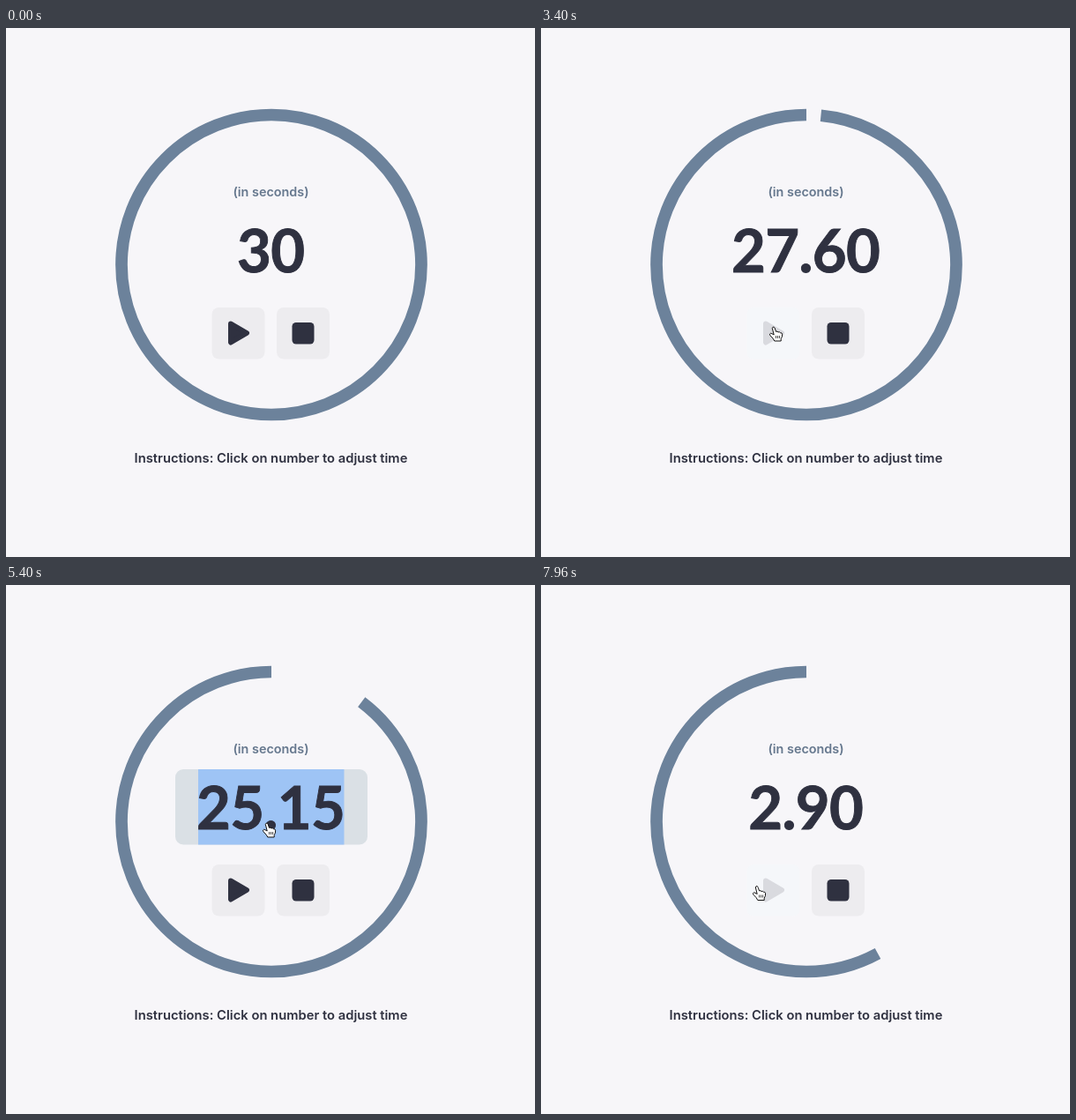
Animation, 600 px wide and 600 px high, one loop 8000 ms. Source, as an HTML page:

```html
<!DOCTYPE html>
<html lang="en">
<head>
<meta charset="utf-8">
<title>Countdown timer</title>
<style>
  html, body { margin: 0; width: 100%; height: 100%; overflow: hidden; background: #f7f6f9; }
  svg { display: block; width: 100vw; height: 100vh; }
  text { text-anchor: middle; font-family: Inter, sans-serif; font-weight: 600; fill: #2f3140; }
  #value { font: 700 67px Lato, sans-serif; letter-spacing: -.6px; stroke: #2f3140; stroke-width: .9; }
  #unit { fill: #66788e; }
  .icon { fill: #2f3140; }
  .triangle { stroke: #2f3140; stroke-width: 6; stroke-linejoin: round; }
  .disabled .icon { fill: #d9dadf; stroke: #d9dadf; }
  .face { fill: #edecef; }
  .hover .face { fill: #dddbdf; }
  .disabled .face { fill: #f5f7fa; }
</style>
</head>
<body>
<svg viewBox="0 0 600 600">
  <circle id="ring" cx="301" cy="268.5" r="170" pathLength="360" fill="none"
    stroke="#6c829b" stroke-width="13.7" transform="rotate(-90 301 268.5)"/>
  <text id="unit" x="300.5" y="190.5" font-size="14.4">(in seconds)</text>
  <rect id="field" x="192" y="209" width="218" height="85.5" rx="9" fill="#dae0e5"/>
  <rect id="selection" x="218" y="209" width="165.5" height="85.5" fill="#9ec4f5"/>
  <text id="value" x="300.2" y="276.9"></text>
  <g id="play">
    <rect class="face" x="233.5" y="317" width="60" height="58.5" rx="8"/>
    <path class="icon triangle" d="M255 335.5L273 346L255 356.5Z"/>
  </g>
  <g id="stop">
    <rect class="face" x="307" y="317" width="60" height="58.5" rx="8"/>
    <rect class="icon" x="324.5" y="334" width="25" height="24.5" rx="4.5"/>
  </g>
  <text x="300.5" y="492.8" font-size="14.75">Instructions: Click on number to adjust time</text>
  <g id="cursor">
    <path id="arrow" fill="#000" stroke="#fff" d="M0 0V14L3.4 11L5.6 16L8 15L5.8 10H10Z"/>
    <g id="hand" stroke="#111" stroke-linejoin="round">
      <path fill="#fff" d="M-1.7 1.4Q-1.2 -.4 .2 .2Q1 .5 1.4 2L2.5 5.4Q4.2 4.5 5 6Q6.6 5.2 7.4 6.7
        Q9.3 6.3 9.6 8.2Q9.9 11.5 8.2 13.6V16H.8Q0 13.5 -4 9.8Q-5.3 7.8 -3.6 7.3Q-2.2 7.4 .2 9Z"/>
      <path fill="none" stroke-width=".8" d="M2.6 10V13M4.6 10V13M6.6 10V13"/>
    </g>
  </g>
</svg>
<script>
const LOOP = 8000, STEP = 40, RATE = 1.745 / 1000;
const $ = id => document.getElementById(id);

// Countdown runs: start time, stop time, starting seconds
const runs = [
  { start: 1594, stop: 2723, total: 30 },
  { start: 3152, stop: 4802, total: 28.03 },
  { start: 6754, stop: LOOP, total: 5 }
];

const FOCUS = 5360, TYPED = 5760, BLUR = 6754;

// Cursor tip: time, x, y
const moves = [
  [720, 91, 547], [1400, 255, 346], [2200, 255, 346], [2560, 323, 343],
  [2740, 323, 343], [3080, 264, 339], [4160, 264, 339], [4640, 323, 343],
  [4860, 323, 343], [5300, 296, 270], [6120, 296, 270], [6600, 263, 342],
  [6960, 263, 342], [7920, 245, 341.5]
];

const between = (t, a, b) => t >= a && t < b;
const ease = p => p * p * (3 - 2 * p);
const show = (id, on) => $(id).setAttribute('display', on ? 'inline' : 'none');

function cursorAt(t) {
  const next = moves.findIndex(m => m[0] > t);
  if (next < 1) return moves[next < 0 ? moves.length - 1 : 0].slice(1);
  const [t0, x0, y0] = moves[next - 1], [t1, x1, y1] = moves[next];
  const p = ease((t - t0) / (t1 - t0));
  return [x0 + (x1 - x0) * p, y0 + (y1 - y0) * p];
}

function draw(t) {
  const run = runs.filter(r => r.start <= t).pop();
  const running = Boolean(run) && t < run.stop;
  const left = run ? run.total - RATE * (Math.min(t, run.stop) - run.start) : 30;
  const gap = run ? 360 * (1 - left / run.total) : 0;
  $('ring').setAttribute('stroke-dasharray', gap ? `0 ${gap} 360` : 'none');
  $('value').textContent = between(t, TYPED, BLUR) ? '5' : run ? left.toFixed(2) : '30';

  const visible = t >= moves[0][0] && !between(t, TYPED, 6120);
  const [x, y] = cursorAt(t);
  const inside = (x0, y0, x1, y1) => visible && between(x, x0, x1) && between(y, y0, y1);
  const overPlay = inside(234, 317, 294, 376);
  const overStop = inside(307, 317, 367, 376);
  const overField = inside(192, 209, 410, 295);
  const pointing = overPlay || overStop || overField;

  $('play').setAttribute('class', running ? 'disabled' : overPlay ? 'hover' : '');
  $('stop').setAttribute('class', overStop ? 'hover' : '');
  show('field', overField || between(t, FOCUS, BLUR));
  show('selection', between(t, FOCUS, TYPED));
  show('cursor', visible);
  show('hand', pointing);
  show('arrow', !pointing);
  $('cursor').setAttribute('transform', `translate(${x} ${y})`);
}

const began = performance.now();
function tick() {
  const t = (performance.now() - began) % LOOP;
  draw(Math.floor(t / STEP) * STEP);
  requestAnimationFrame(tick);
}
tick();
</script>
</body>
</html>
```
